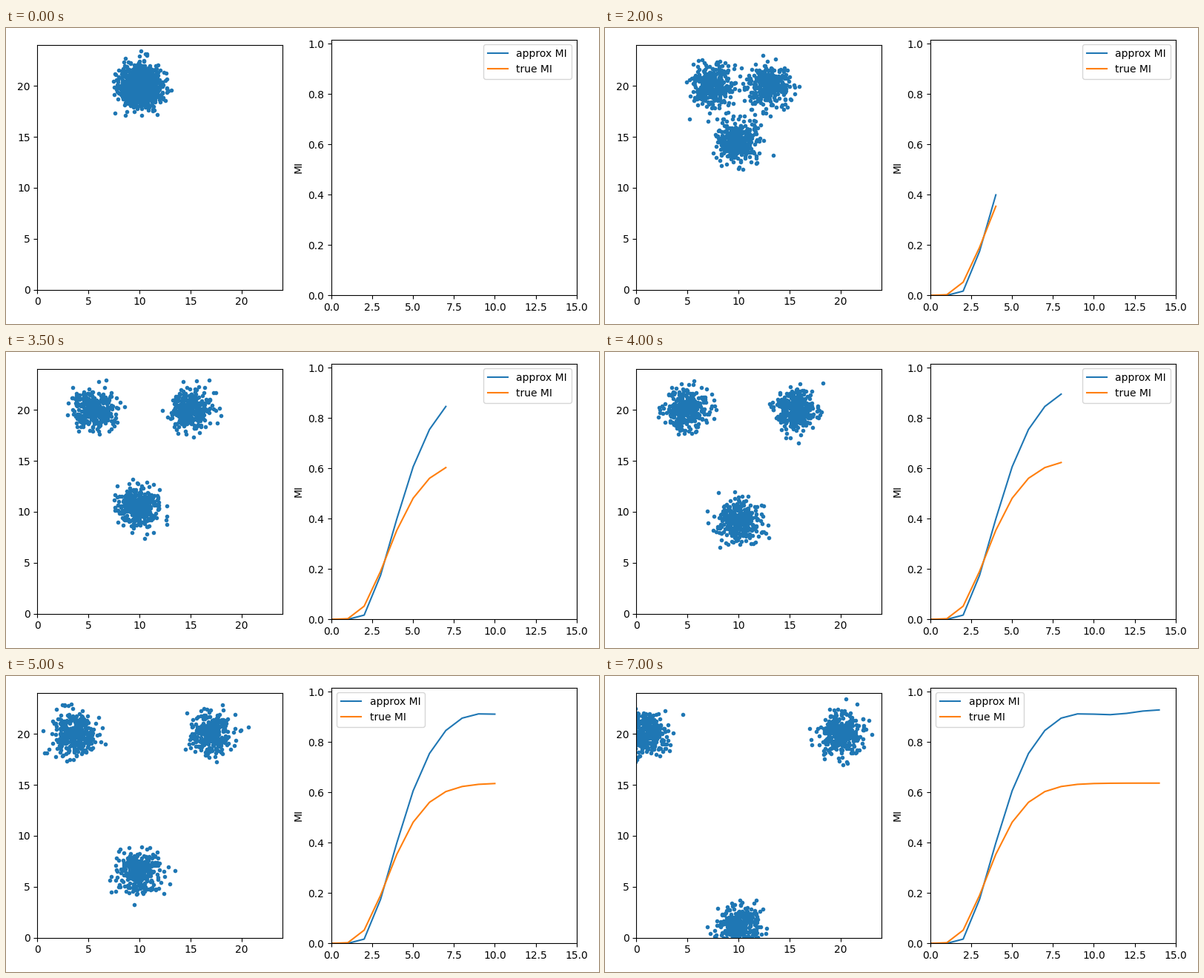
Animation, 800 px wide and 400 px high, one loop 7.5 s. Source, as a matplotlib script:

```python
import numpy as np
import matplotlib.pyplot as plt
from matplotlib.animation import FuncAnimation

STEPS = 15
PER_CLUSTER = 333
START = np.array([10, 20])
ENDS = np.array([[1, 20], [20, 20], [10, 1]])
LIMIT = np.log(3) - 2 / 3 * np.log(2)  # MI of fully separated clusters, in nats


def centers(step):
    return START + (ENDS - START) * step / (STEPS - 1)


def sample(step):
    """Unit Gaussians around the drifting centers, redrawn at every step."""
    noise = np.random.default_rng(100 + step).normal(size=(3, PER_CLUSTER, 2))
    return (centers(step)[:, None] + noise).reshape(-1, 2)


def true_mi(step):
    """Mutual information of x and y for the mixture, integrated on a grid."""
    cell = 0.1
    grid = np.arange(-6, 27, cell)
    bumps = np.exp(-(grid - centers(step)[..., None]) ** 2 / 2) / np.sqrt(2 * np.pi)
    in_x, in_y = bumps[:, 0], bumps[:, 1]
    joint = in_x.T @ in_y / len(ENDS)
    product = np.outer(in_x.mean(axis=0), in_y.mean(axis=0))
    tiny = 1e-300
    return np.sum(joint * np.log((joint + tiny) / (product + tiny))) * cell ** 2


def approx_mi(step):
    """Estimate in bits: late start, smooth saturation, slight wobble on top."""
    rise = 1 - np.exp(-(np.maximum(step - 1.65, 0) / 3.21) ** 1.8)
    wobble = 0.009 * np.cos(np.pi * (step - 8) / 3) * rise ** 9
    return LIMIT / np.log(2) * rise + wobble


steps = np.arange(STEPS)
approx = approx_mi(steps)
true = np.array([true_mi(s) for s in steps])

plt.rcParams["font.family"] = "DejaVu Sans"
fig, (cloud_ax, mi_ax) = plt.subplots(1, 2, figsize=(8, 4), dpi=100)

cloud_ax.set(xlim=(0, 24), ylim=(0, 24), aspect="equal",
             xticks=range(0, 24, 5), yticks=range(0, 24, 5))
dots, = cloud_ax.plot([], [], ".", color="C0")

mi_ax.set(xlim=(0, STEPS), ylim=(0, 1.0164), ylabel="MI")
approx_line, = mi_ax.plot([], [], color="C0", label="approx MI")
true_line, = mi_ax.plot([], [], color="C1", label="true MI")
mi_ax.legend(loc="best")  # moves aside when the curves reach it
fig.tight_layout()


def update(step):
    shown = slice(step + 1)
    dots.set_data(*sample(step).T)
    approx_line.set_data(steps[shown], approx[shown])
    true_line.set_data(steps[shown], true[shown])
    return dots, approx_line, true_line


anim = FuncAnimation(fig, update, frames=STEPS, interval=500,
                     repeat=True, repeat_delay=0, blit=False)
plt.show()
```
